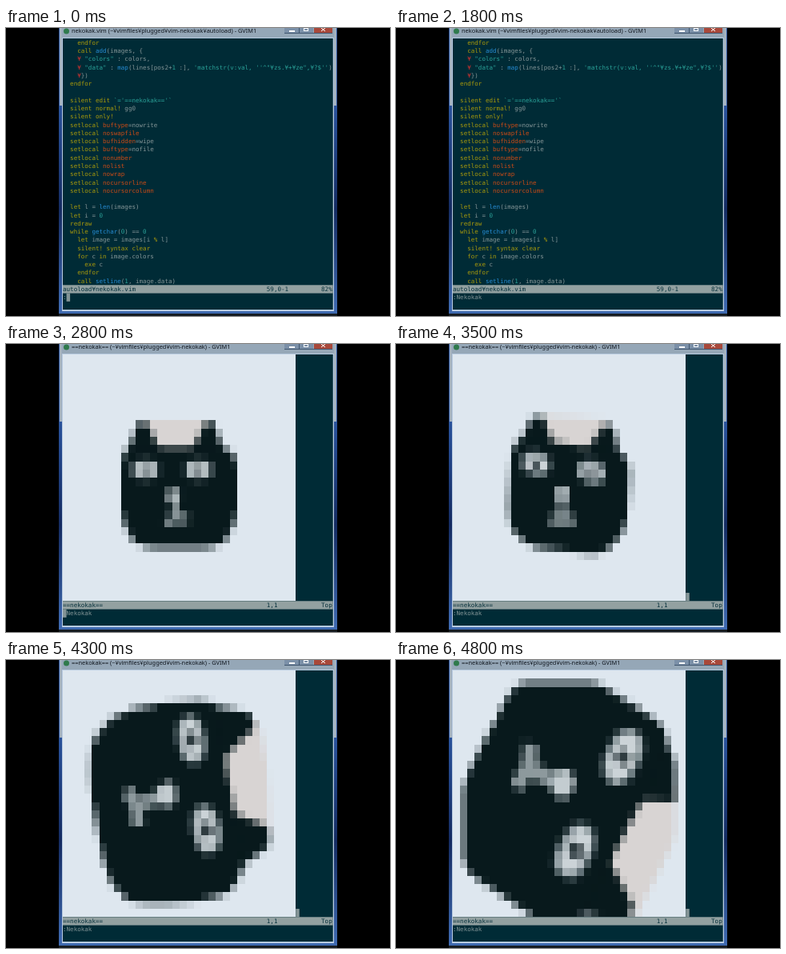
These frames come from a looping animation (480x360 px, 5000 ms). An HTML page with a canvas:

```html
<!DOCTYPE html>
<html>
<head>
<meta charset="utf-8">
<style>
html, body { margin: 0; width: 100%; height: 100%; overflow: hidden; background: #000; }
canvas { display: block; }
</style>
</head>
<body>
<canvas id="stage" width="480" height="360"></canvas>
<script>
const ctx = document.getElementById('stage').getContext('2d');
const LOOP = 5000, TYPED = 1300, ENTER = 1800, BLANK = 2500, SHOW = 2800, SPIN = 3500;
const LEFT = 71, TOP = 13.2, CHAR_W = 4.55, ROW_H = 10.27, COLS = 74, ROWS = 30;
const MOSAIC_W = 32, TURNS = 10;
const C = {
  bg: '#002b36', text: '#839496', key: '#a99a0c', option: '#cb4b16', func: '#268bd2',
  string: '#2aa198', red: '#dc322f', bar: '#93a1a1', ink: '#05303b',
  paper: '#dee7ef', fur: '#08191c', patch: '#d8d4d3', eye: '#cbd3d7'
};

const code = `    endfor
    call add(images, {
    ¥ "colors" : colors,
    ¥ "data" : map(lines[pos2+1 :], 'matchstr(v:val, ''^"¥zs.¥+¥ze",¥?$'')
    ¥})
  endfor

  silent edit \`='==nekokak=='\`
  silent normal! gg0
  silent only!
  setlocal buftype=nowrite
  setlocal noswapfile
  setlocal bufhidden=wipe
  setlocal buftype=nofile
  setlocal nonumber
  setlocal nolist
  setlocal nowrap
  setlocal nocursorline
  setlocal nocursorcolumn

  let l = len(images)
  let i = 0
  redraw
  while getchar(0) == 0
    let image = images[i % l]
    silent! syntax clear
    for c in image.colors
      exe c
    endfor
    call setline(1, image.data)`.split('\n');

const rules = [
  ["'.*'|\"[^\"]*\"|`.*`|\\b\\d+\\b", C.string],
  ['¥', C.red],
  ['\\b(?:endfor|call|silent|edit|normal|only|setlocal|let|redraw|while|syntax|clear|for|in|exe)\\b!?|%', C.key],
  ['\\b(?:buftype|bufhidden|no(?:swapfile|number|list|wrap|cursorline|cursorcolumn))\\b', C.option],
  ['\\b(?:add|map|len|getchar|setline)(?=\\()', C.func]
];
const tokens = new RegExp(rules.map(r => '(' + r[0] + ')').join('|'), 'g');

const mosaic = document.createElement('canvas');
mosaic.width = MOSAIC_W;
mosaic.height = ROWS;
const m = mosaic.getContext('2d');

function box(color, x, y, w, h) {
  ctx.fillStyle = color;
  ctx.fillRect(x, y, w, h);
}

function print(str, col, row, color) {
  ctx.font = '7.56px "DejaVu Sans Mono", monospace';
  ctx.fillStyle = color;
  [...str].forEach((ch, i) => {
    if (ch !== ' ') ctx.fillText(ch, LEFT + (col + i) * CHAR_W, TOP + (row + 0.56) * ROW_H);
  });
}

function cursor(col, row) {
  box(C.text, LEFT + col * CHAR_W, TOP + row * ROW_H, CHAR_W, ROW_H);
}

function drawWindow(title) {
  box('#000', 0, 0, 480, 360);
  const frame = ctx.createLinearGradient(0, 97, 0, 355);
  frame.addColorStop(0, '#2a539c');
  frame.addColorStop(0.5, '#152c62');
  frame.addColorStop(1, '#3f6ab0');
  box(frame, 66, 0, 348, 357);
  box('#a3b2c0', 67, 0, 346, 97);
  box('#161c22', 66, 357, 348, 3);
  box('#b9cbe0', 70, 0, 340, 354);
  box('#95a7b7', 70, 0, 340, 12);
  box('#7b90a8', 348, 0, 36, 6);
  box('#a8483a', 385, 0, 23, 6);
  box('#40566f', 366, 0, 1, 6);
  box('#40566f', 348, 6, 60, 1);
  box('#fff', 354, 3, 7, 2);
  ctx.strokeStyle = '#fff';
  ctx.strokeRect(372.5, 0.5, 5, 3);
  ctx.beginPath();
  ctx.moveTo(394, 0); ctx.lineTo(399, 4);
  ctx.moveTo(399, 0); ctx.lineTo(394, 4);
  ctx.stroke();
  ctx.fillStyle = '#2f7a4c';
  ctx.beginPath();
  ctx.arc(75.5, 4, 3.5, 0, 7);
  ctx.fill();
  ctx.font = '7.4px "Noto Sans", sans-serif';
  ctx.fillStyle = '#10161e';
  ctx.fillText(title, 82, 4);
  box(C.bg, LEFT, 13, COLS * CHAR_W + 1, 339);
}

function drawStatus(name, position, percent) {
  box(C.bar, LEFT, TOP + ROWS * ROW_H, COLS * CHAR_W + 1, ROW_H);
  print(name, 0, ROWS, C.ink);
  print(position, 56, ROWS, C.ink);
  print(percent, 71, ROWS, C.ink);
}

function drawCode() {
  code.forEach((line, row) => {
    let end = 0;
    for (const hit of line.matchAll(tokens)) {
      print(line.slice(end, hit.index), end, row, C.text);
      const kind = hit.slice(1).findIndex(Boolean);
      print(hit[0], hit.index, row, rules[kind][1]);
      end = hit.index + hit[0].length;
    }
    print(line.slice(end), end, row, C.text);
  });
}

function oval(color, x, y, rx, ry) {
  m.beginPath();
  m.ellipse(x, y, rx, ry, 0, 0, 7);
  m.fillStyle = color;
  m.fill();
}

function stroke(color, width, ...points) {
  m.beginPath();
  points.forEach(p => m.lineTo(...p));
  m.strokeStyle = color;
  m.lineWidth = width;
  m.stroke();
}

function drawEar(x, side) {
  m.beginPath();
  m.moveTo(x + side * 2.4, -3);
  m.lineTo(x + side * 0.6, -7.7);
  m.lineTo(x - side * 0.6, -7.7);
  m.lineTo(x - side * 2.7, -4);
  m.fillStyle = C.fur;
  m.fill();
}

function drawEye(x, y) {
  oval('#66757a', x, y, 2, 1.35);
  oval(C.eye, x, y, 1.7, 1);
  oval('#2f3c40', x, y, 0.55, 0.6);
}

// Painted on a 32-wide grid, so that antialiasing yields the mosaic shades
function drawCat(angle) {
  const scale = 1 + angle * 0.0068, half = 8 * scale;
  m.save();
  m.fillStyle = C.paper;
  m.fillRect(0, 0, MOSAIC_W, ROWS);
  m.translate(16, 16);
  // The turning picture is cropped to an upright square
  m.beginPath();
  m.rect(-half, -half, 2 * half, 2 * half);
  m.clip();
  m.rotate(angle * Math.PI / 180);
  m.scale(scale, scale);
  m.fillStyle = C.patch;
  m.fillRect(-4.8, -8.2, 9, 5);
  drawEar(-5.1, -1);
  drawEar(4.2, 1);
  m.beginPath();
  m.roundRect(-8, -4.7, 16, 12.3, [2, 2.8, 4.8, 4.8]);
  m.fillStyle = C.fur;
  m.fill();
  drawEye(-4.65, -2);
  drawEye(2.6, -2);
  stroke('#8d999d', 1, [-0.8, 1], [-0.4, 3.9]);
  stroke('#8d999d', 1.1, [-1.9, 4.4], [-0.4, 3.8], [1.2, 4]);
  oval('#c3ccd0', -0.8, 1, 0.95, 0.85);
  m.restore();
  ctx.imageSmoothingEnabled = false;
  ctx.drawImage(mosaic, LEFT, TOP, MOSAIC_W * 2 * CHAR_W, ROWS * ROW_H);
}

// Three turns per 400 ms, shown on a 100 ms clock
function turnAt(t) {
  return Math.floor((Math.floor((t - SPIN) / 100) + 0.5) * 0.75);
}

function angleOf(turn) {
  const p = turn / TURNS;
  return 7.5 + 112.5 * (p - 0.06 * Math.sin(2 * Math.PI * p));
}

function render(t) {
  const editing = t < BLANK;
  ctx.textBaseline = 'middle';
  drawWindow(editing
    ? 'nekokak.vim (~¥vimfiles¥plugged¥vim-nekokak¥autoload) - GVIM1'
    : '==nekokak== (~¥vimfiles¥plugged¥vim-nekokak) - GVIM1');

  // Typing starts fast and slows down
  const clock = Math.floor(t / 100) * 100;
  const command = ':' + 'Nekokak'.slice(0, Math.floor(7 * (clock / TYPED) ** 0.57));

  if (editing) {
    drawCode();
    drawStatus('autoload¥nekokak.vim', '59,0-1', '82%');
    if (t < ENTER) cursor(command.length, ROWS + 1);
  } else if (t < SHOW) {
    for (let row = 1; row < ROWS; row++) print('~', 0, row, '#657b83');
    drawStatus('==nekokak==', '0,0-1', 'All');
  } else {
    const turn = turnAt(t);
    drawCat(t < SPIN ? 0 : angleOf(turn));
    drawStatus('==nekokak==', '1,1', 'Top');
    if (t < SPIN) cursor(0, ROWS + 1);
    else if (turn % 5 < 2) cursor(2 * MOSAIC_W, ROWS - 1);
  }
  print(command, 0, ROWS + 1, C.text);
}

const begin = performance.now();
function tick() {
  render((performance.now() - begin) % LOOP);
  requestAnimationFrame(tick);
}
tick();
</script>
</body>
</html>
```
